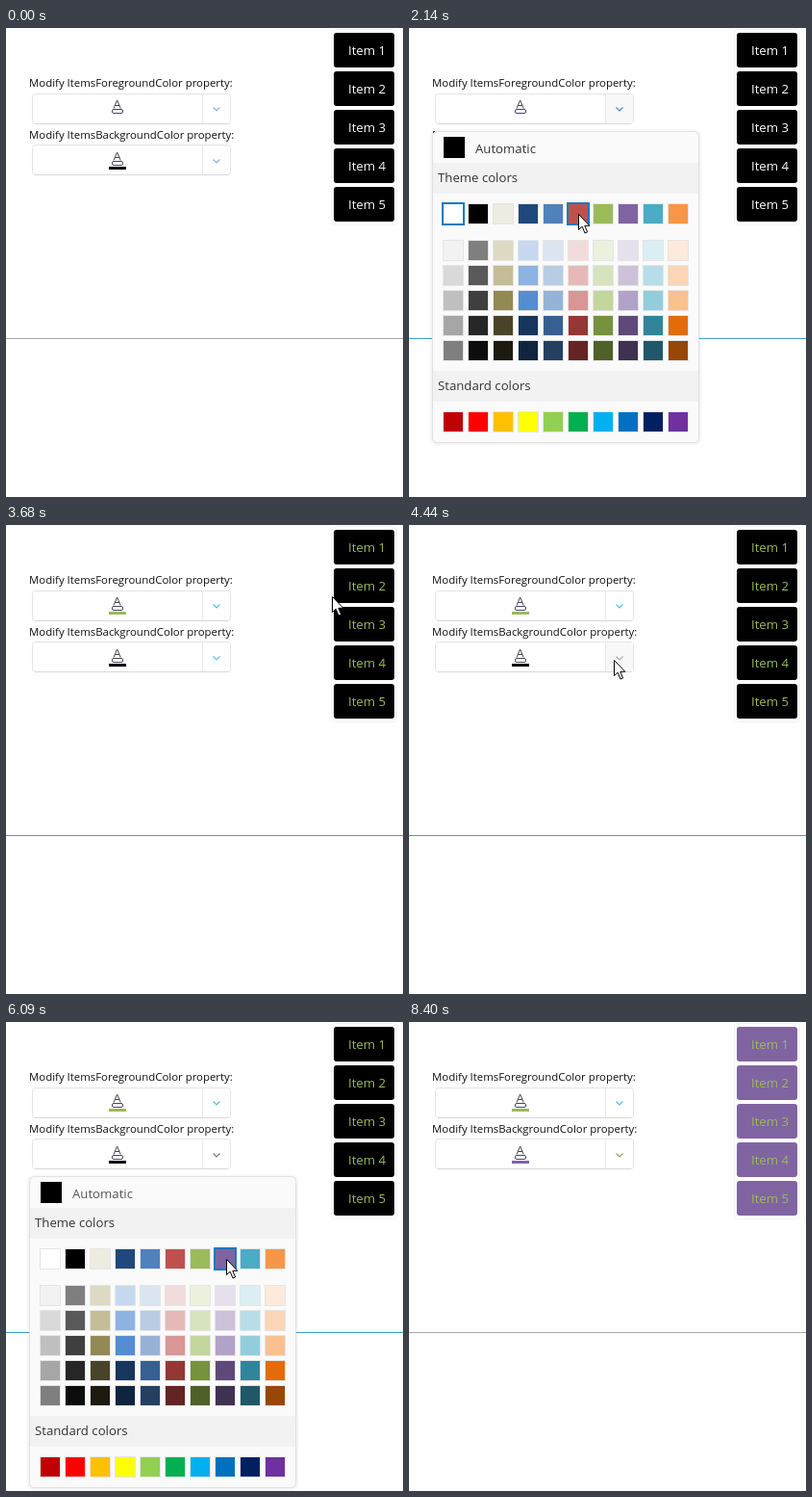
Animation of 413x487 px, one loop 8520 ms. Source, as an HTML page:

```html
<!DOCTYPE html>
<html lang="en">
<head>
<meta charset="utf-8">
<title>Item colors</title>
<style>
html, body { margin: 0; width: 100%; height: 100%; overflow: hidden; background: #fff; }
svg { display: block; }
text { font: 13.2px "Open Sans", "Noto Sans", sans-serif; fill: #333; }
.label { font-size: 11.4px; fill: #111; }
</style>
</head>
<body>
<svg id="stage" width="413" height="487" viewBox="0 0 413 487"></svg>
<script>
const LOOP = 8520;
const GREEN = '#9bbb59', PURPLE = '#8064a2';
const stage = document.getElementById('stage');

function add(parent, tag, attrs, text) {
  const el = document.createElementNS('http://www.w3.org/2000/svg', tag);
  set(el, attrs);
  if (text) el.textContent = text;
  parent.appendChild(el);
  return el;
}
function set(el, attrs) {
  for (const key in attrs) el.setAttribute(key, attrs[key]);
}
const rect = (parent, x, y, width, height, fill, more) =>
  add(parent, 'rect', { x, y, width, height, fill, ...more });
const show = (el, on) => set(el, { visibility: on ? 'visible' : 'hidden' });

// Each column: theme color, then its five shades
const theme = [
  'ffffff f2f2f2 d9d9d9 bfbfbf a6a6a6 7f7f7f',
  '000000 7f7f7f 595959 3f3f3f 262626 0c0c0c',
  'eeece1 ddd9c3 c4bd97 938953 494429 1d1b10',
  '1f497d c6d9f0 8db3e2 548dd4 17365d 0f243e',
  '4f81bd dbe5f1 b8cce4 95b3d7 366092 244061',
  'c0504d f2dcdb e5b9b7 d99694 953734 632423',
  '9bbb59 ebf1dd d7e3bc c3d69b 76923c 4f6128',
  '8064a2 e5e0ec ccc1d9 b2a2c7 5f497a 3f3151',
  '4bacc6 dbeef3 b7dde8 92cddc 31859b 205867',
  'f79646 fdeada fbd5b5 fac08f e36c09 974806'
].map(column => column.split(' '));
const standard = 'c00000 ff0000 ffc000 ffff00 92d050 00b050 00b0f0 0070c0 002060 7030a0'.split(' ');

function makePicker(name, boxY, textY) {
  add(stage, 'text', { x: 24, y: textY, class: 'label' }, `Modify Items${name}Color property:`);
  rect(stage, 27.5, boxY + .5, 206, 31, '#fff', { rx: 3, stroke: '#e4e4e4' });
  rect(stage, 30, boxY + 31, 201, 1, '#d8d8d8');
  const hover = rect(stage, 205, boxY + 1, 28, 30, '#f8f8f8');
  rect(stage, 204, boxY + 1, 1, 30, '#e8e8e8');
  const icon = add(stage, 'g', { transform: `translate(0 ${textY - 61})`, fill: 'none' });
  add(icon, 'path', { d: 'M112 83.5L115.6 75L119.2 83.5M113.3 80.5H118', stroke: '#444' });
  rect(icon, 110.5, 84.5, 11, 4, 'none', { rx: 1.5, stroke: '#4b4264' });
  const bar = rect(icon, 107, 90, 18, 3, '#000');
  const chevron = add(icon, 'path', { d: 'M215.5 82.5L219 86L222.5 82.5', 'stroke-width': 1.1 });
  return { hover, bar, chevron };
}

function makePopup(top) {
  const g = add(stage, 'g', { transform: `translate(0 ${top})` });
  for (let i = 3; i > 0; i--)
    rect(g, 24 - i, 1 - i, 278 + 2 * i, 323 + 2 * i, '#000', { rx: 5 + i, opacity: .015 });
  rect(g, 24.5, .5, 277, 323, '#fafafa', { rx: 5, stroke: '#e1e1e1' });
  rect(g, 25, 33, 276, 32, '#f2f2f2');
  rect(g, 25, 249, 276, 32, '#f2f2f2');
  rect(g, 36, 6, 22, 22, '#000');
  const auto = add(g, 'text', { x: 69, y: 23 }, 'Automatic');
  add(g, 'text', { x: 30, y: 53 }, 'Theme colors');
  add(g, 'text', { x: 30, y: 269 }, 'Standard colors');
  const swatch = (i, y, color) =>
    rect(g, 35.5 + 26 * i, y + .5, 21, 21, '#' + color, { stroke: '#e5e5e5' });
  theme.forEach((column, i) => column.forEach((color, row) =>
    swatch(i, row ? 87 + 26 * row : 75, color)));
  standard.forEach((color, i) => swatch(i, 291, color));
  const outline = () => rect(g, 35, 75, 22, 22, 'none', { stroke: '#1479bd', 'stroke-width': 2 });
  return { g, auto, selected: outline(), hovered: outline() };
}

const line = rect(stage, 0, 322, 413, 1, '#a8a8a8');
rect(stage, 338.5, 1.5, 68, 203, '#fff', { rx: 3, stroke: '#f2f2f2' });
const items = [1, 2, 3, 4, 5].map(n => ({
  box: rect(stage, 341, 40 * n - 35, 63, 36, '#000', { rx: 3 }),
  text: add(stage, 'text', { x: 356, y: 40 * n - 12 }, 'Item ' + n)
}));
const fore = makePicker('Foreground', 68, 61);
const back = makePicker('Background', 121, 115);
const forePopup = makePopup(107);
const backPopup = makePopup(160);
show(backPopup.selected, false);

const cursor = add(stage, 'g', {});
const click = add(cursor, 'circle', { r: 12, fill: '#ffff70' });
add(cursor, 'path', {
  d: 'M.5 .5V16.5L4.2 13.2L7 20L9.6 18.9L6.8 12.3H11.8Z', fill: '#fff', stroke: '#000'
});
const hourglass = add(cursor, 'path', {
  d: 'M11.5 2H21.5M11.5 17H21.5M13 2V5L16 9.5L13 14V17M20 2V5L17 9.5L20 14V17M14.5 6H18.5M14 15H19M16.5 10V14',
  fill: 'none', stroke: '#000', 'stroke-width': 1.6
});

// Pointer path: time, x, y
const path = [
  [120, 361, 433], [640, 226, 80], [1430, 226, 80], [1800, 152, 190], [2140, 176, 193],
  [2300, 178, 194], [2480, 197, 197], [3160, 197, 197], [3560, 352, 60], [3980, 286, 130],
  [4070, 280, 132], [4440, 213, 140], [5170, 213, 140], [5520, 238, 205], [5760, 247, 243],
  [5910, 237, 248], [6030, 233, 247], [6090, 229, 246], [7240, 229, 246], [7300, 236, 253],
  [7360, 241, 259], [7540, 241, 259], [7600, 246, 265], [7760, 246, 265], [8060, 355, 450],
  [8120, 355, 450]
];
function pointerAt(t) {
  const next = path.findIndex(p => p[0] > t);
  if (next < 1) return null;
  const [t0, x0, y0] = path[next - 1], [t1, x1, y1] = path[next];
  const k = (t - t0) / (t1 - t0), e = k * k * (3 - 2 * k);
  return [x0 + (x1 - x0) * e, y0 + (y1 - y0) * e];
}

const within = (t, a, b) => t >= a && t < b;

function drawPopup(popup, t, top, open, close, pos) {
  show(popup.g, within(t, open, close));
  set(popup.g, { opacity: Math.min(1, .25 + (t - open) / 200) });
  const col = pos ? Math.floor((pos[0] - 34) / 26) : -1;
  const over = pos && within(pos[1] - top, 74, 98) && within(col, 0, 10);
  set(popup.hovered, { x: 35 + 26 * col, opacity: over ? 1 : 0 });
}

function draw(t) {
  const pos = pointerAt(t);
  const picked = t >= 2760, filled = t >= 6490;
  set(line, { fill: within(t, 790, 8400) ? '#3c9fd0' : '#a8a8a8' });
  for (const { box, text } of items) {
    set(box, { fill: filled ? PURPLE : '#000' });
    text.style.fill = picked ? GREEN : '#fff';
  }

  set(fore.bar, { fill: picked ? GREEN : '#fff' });
  set(back.bar, { fill: filled ? PURPLE : '#000' });
  set(fore.chevron, { stroke: picked ? '#4fbfd6' : t >= 640 ? '#3a8fd0' : '#86b6d4' });
  set(back.chevron, {
    stroke: filled ? '#9a9c58' : t >= 4530 ? '#777' : t >= 4380 ? '#aaa' : picked ? '#5cc0d2' : '#86b6c8'
  });
  show(fore.hover, within(t, 600, 2760));
  show(back.hover, within(t, 4380, 5300));

  drawPopup(forePopup, t, 107, 910, 2760, pos);
  drawPopup(backPopup, t, 160, 4590, 6490, pos);
  backPopup.auto.style.fill = t >= 5230 ? '#555' : '#333';

  show(cursor, pos);
  if (pos) set(cursor, { transform: `translate(${pos.map(Math.round)})` });
  const clicking = [[790, 1030], [2480, 2820], [4530, 4710], [6370, 6490]].some(c => within(t, ...c));
  set(click, { opacity: clicking ? 1 : 0 });
  set(hourglass, { opacity: t >= 6740 ? 1 : 0 });
}

const start = performance.now();
function frame() {
  draw((performance.now() - start) % LOOP);
  requestAnimationFrame(frame);
}
frame();
</script>
</body>
</html>
```
